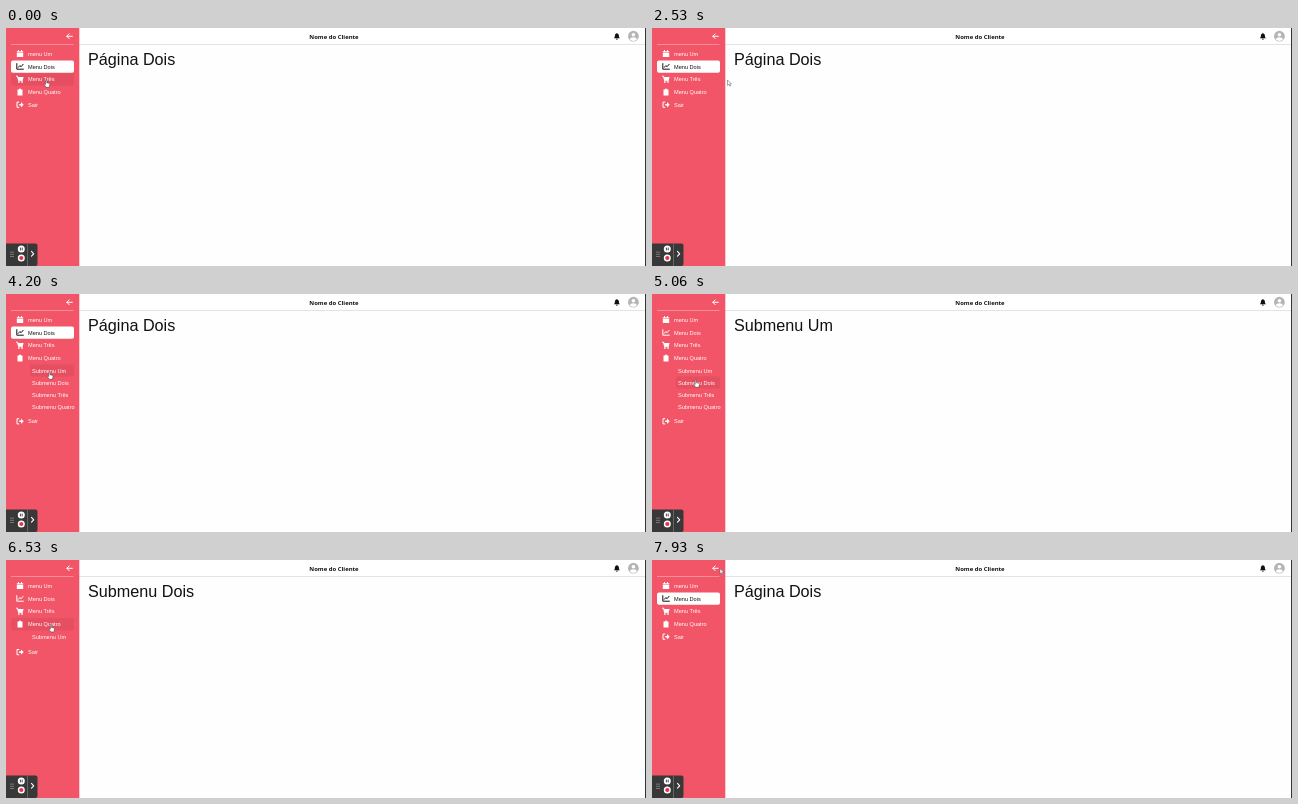
An HTML page for the animation above (8 s loop, 640 px wide and 238 px high).

```html
<!DOCTYPE html>
<html lang="pt">
<head>
<meta charset="utf-8">
<title>Menu lateral</title>
<style>
  html, body { margin: 0; width: 100%; height: 100%; overflow: hidden; background: #fefefe; }
  svg { display: block; width: 100%; height: 100%; }
  text { font-family: "Liberation Sans", Arial, sans-serif; }
  .item { font-size: 5.6px; }
  .line { fill: none; stroke: currentColor; stroke-linecap: round; stroke-linejoin: round; }
</style>
</head>
<body>
<svg viewBox="0 0 640 238">
  <rect width="640" height="238" fill="#fefefe"/>
  <rect x="73" width="567" height="16" fill="#fff"/>
  <rect x="73" y="16" width="567" height=".8" fill="#dcdcdc"/>
  <rect x="639" width="1" height="238" fill="#333"/>
  <text x="328" y="10.5" text-anchor="middle" style="font:700 5.95px 'Open Sans',sans-serif" fill="#111">Nome do Cliente</text>
  <path d="M607.9 10.3c.9-.9 1-1.6 1-2.7 0-1.1.7-1.9 1.7-2.1v-.4h.6v.4c1 .2 1.7 1 1.7 2.1 0 1.1.1 1.8 1 2.7zM610 10.8h1.8a.9.9 0 0 1-1.8 0z" fill="#111"/>
  <circle cx="627.4" cy="8.2" r="5.4" fill="#b5b5b5"/>
  <circle cx="627.4" cy="6.7" r="1.8" fill="#fff"/>
  <path d="M623.9 11.6c.3-3 6.7-3 7 0a5 5 0 0 1-7 0z" fill="#fff"/>

  <rect width="73.3" height="238" fill="#f25567"/>
  <path class="line" color="#fff" stroke-width="1" d="M66.3 8.3h-5.5m2.4-2.4-2.4 2.4 2.4 2.4"/>
  <rect x="5" y="16" width="62.5" height=".7" fill="#f9a5ae"/>
  <g id="menu"></g>
  <text id="page" x="82" y="36.6" font-size="16.2" fill="#111"></text>

  <path d="M0 215.5h29.5a2 2 0 0 1 2 2v18.5a2 2 0 0 1-2 2H0z" fill="#383838"/>
  <rect x="21.3" y="215.5" width=".7" height="22.5" fill="#777"/>
  <g id="grip" fill="#bbb"></g>
  <circle cx="15.3" cy="221" r="3.5" fill="#fff"/>
  <path d="M14.4 219.6v2.8m1.8-2.8v2.8" stroke="#333" stroke-width=".9"/>
  <circle cx="15.3" cy="230" r="3.5" fill="#fff"/>
  <circle cx="15.3" cy="230" r="2.1" fill="#e0344a"/>
  <path class="line" color="#fff" stroke-width="1.1" d="M25.5 223.4l2.2 2.4-2.2 2.4"/>

  <ellipse id="ripple" cx="39" cy="39" rx="9.3" ry="6" fill="#8c3345" opacity=".3"/>
  <g id="arrow">
    <path d="M0 0v5.4l1.3-1.1.9 1.9.9-.4-.9-1.8h1.7z" fill="#fff" stroke="#555" stroke-width=".5"/>
  </g>
  <g id="hand">
    <path d="M-.7.5c0-.8 1.2-.8 1.2 0v2.3l2.4.5c.6.2.7.6.6 1.2l-.5 2.8H-.2L-2 4.8c-.3-.6.4-1 .9-.6l.4.4z" fill="#fff" stroke="#333" stroke-width=".5"/>
  </g>
</svg>
<script>
const LOOP = 8000, STEP = 200 / 3;
const $ = id => document.getElementById(id);
const make = (parent, tag, attrs, label) => {
  const el = document.createElementNS("http://www.w3.org/2000/svg", tag);
  for (const k in attrs) el.setAttribute(k, attrs[k]);
  if (label) el.textContent = label;
  return parent.appendChild(el);
};
const ease = u => u * u * (3 - 2 * u);
const clamp = u => Math.max(0, Math.min(1, u));

// Icons are drawn around their own centre.
const ICONS = {
  calendar: ["M-3.2-2.4h1.3v-1.1h.9v1.1h2v-1.1h.9v1.1h1.3v1.2h-6.4zM-3.2-.7h6.4v4.1h-6.4z", ""],
  chart: ["", "M-3.2-2.8v5.6h6.6M-1.7.9l1.5-1.7 1.3 1.1 2-2.4"],
  cart: ["M-2.4-2.3h6l-.9 3.4h-4.4zM-1.2 2a.8.8 0 1 0 .1 0zM2 2a.8.8 0 1 0 .1 0z", "M-3.6-3h1.2l1 4.5h3.9"],
  clipboard: ["M-2.5-2.5h1.4c.2-1.5 2-1.5 2.2 0h1.4v6h-5z", ""],
  exit: ["M-.8-.8h1.8v-1.9l2.7 2.7-2.7 2.7v-1.9h-1.8z", "M-1.2-2.6h-1.8v5.2h1.8"]
};
const menu = $("menu");

function addRow(label, y, icon) {
  const g = make(menu, "g", {});
  const bg = icon
    ? make(g, "rect", { x: 5, y: y - 6.2, width: 63, height: 12.4, rx: 2 })
    : make(g, "rect", { x: 24, y: y - 6, width: 44, height: 12, rx: 1.5 });
  make(g, "text", { class: "item", x: icon ? 22 : 26, y: y + 2, fill: "currentColor" }, label);
  if (icon) {
    const [solid, stroke] = ICONS[icon];
    const art = make(g, "g", { transform: `translate(14 ${y - .2})` });
    make(art, "path", { d: solid, fill: "currentColor" });
    make(art, "path", { d: stroke, class: "line", "stroke-width": 1 });
  }
  return { g, bg, y, sub: !icon };
}

const rows = [
  addRow("menu Um", 25.8, "calendar"),
  addRow("Menu Dois", 38.6, "chart"),
  addRow("Menu Três", 51.4, "cart"),
  addRow("Menu Quatro", 64.2, "clipboard")
];
const subs = ["Um", "Dois", "Três", "Quatro"].map((n, i) => addRow("Submenu " + n, 76.6 + 12 * i));
const exit = addRow("Sair", 76.9, "exit");
const all = [...rows, ...subs, exit];
for (let i = 0; i < 6; i++)
  make($("grip"), "rect", { x: 4.5 + i % 2 * 2, y: 223.6 + 2.2 * (i >> 1), width: 1, height: 1 });

// [time, title, active row]
const pages = [
  [0, "Página Dois", 1], [530, "Página Três", 2], [1800, "Página Dois", 1],
  [4660, "Submenu Um", -1], [5530, "Submenu Dois", -1], [7400, "Página Dois", 1]
];
// Submenu open and close times.
const folds = [[3530, 1], [5600, 0], [6460, 1], [7400, 0]];
// Pointer tip: [time, x, y]
const path = [
  [0, 40.3, 52], [600, 40.3, 52], [1260, 66, 44.6], [1700, 48, 39], [1900, 48, 39],
  [2530, 75.5, 52], [2860, 121, 60], [3400, 42, 64], [3600, 42, 64], [4200, 43.5, 78],
  [4700, 43.5, 78], [5260, 44, 89], [5550, 44, 89], [6000, 99.5, 118], [6330, 42, 64],
  [6500, 42, 64], [6860, 169, 90], [7200, 115, 72.5], [7330, 39, 38], [7460, 39, 38], [7930, 68, 8.5]
];

function pointer(t) {
  const i = path.findIndex(p => p[0] > t);
  if (i < 0) return path[path.length - 1].slice(1);
  const [t0, x0, y0] = path[i - 1], [t1, x1, y1] = path[i];
  const u = ease((t - t0) / (t1 - t0));
  return [x0 + (x1 - x0) * u, y0 + (y1 - y0) * u];
}

function openness(t) {
  return folds.reduce((v, [at, to]) => t < at ? v : v + (to - v) * ease(clamp((t - at) / 200)), 0);
}

function draw(t) {
  const [, title, active] = pages.filter(p => p[0] <= t).pop();
  const open = openness(t), [x, y] = pointer(t);
  const rippling = t >= 7130 && t < 7400;
  $("page").textContent = title;
  exit.g.setAttribute("transform", `translate(0 ${50.6 * open})`);
  let over = false;
  all.forEach((row, i) => {
    const on = i === active;
    const cy = row === exit ? row.y + 50.6 * open : row.y;
    const usable = !row.sub || open > .9;
    const hit = usable && x > (row.sub ? 24 : 5) && x < 68 && Math.abs(y - cy) < (row.sub ? 6 : 6.9);
    over = over || hit;
    const hover = hit || (rippling && i === 1);
    row.g.setAttribute("color", on ? "#111" : "#fff");
    row.bg.setAttribute("fill", on ? "#fff" : hover ? "#e64f61" : "none");
    if (row.sub) row.g.setAttribute("opacity", clamp(open * 5.2 - (i - 4) - .6));
  });
  $("ripple").style.display = rippling ? "" : "none";
  for (const [id, shown] of [["hand", over], ["arrow", !over]]) {
    $(id).style.display = shown ? "" : "none";
    $(id).setAttribute("transform", `translate(${x} ${y})`);
  }
}

const start = performance.now();
function tick() {
  const t = (performance.now() - start) % LOOP;
  draw(Math.min(LOOP - 1, Math.floor((t + 6.8) / STEP) * STEP));
  requestAnimationFrame(tick);
}
tick();
</script>
</body>
</html>
```
